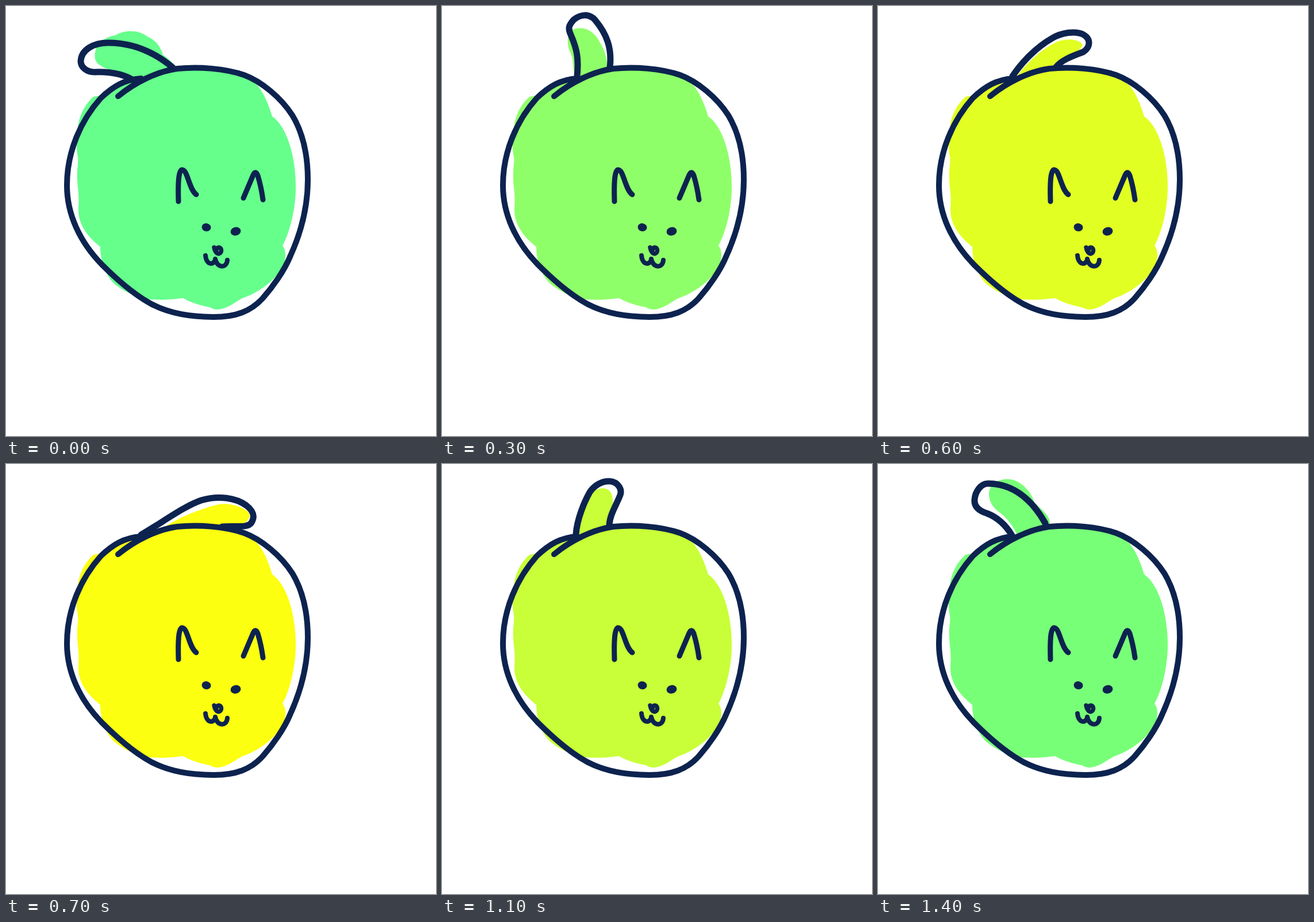
These frames come from a looping animation (748x748 px, 1.5 s). An HTML page:

```html
<!DOCTYPE html>
<html lang="en">
<head>
<meta charset="utf-8">
<title>Apple to lemon</title>
<style>
  html, body { margin: 0; width: 100%; height: 100%; overflow: hidden; background: #fff; }
  svg { display: block; width: 100%; height: 100%; }
  .ink { fill: none; stroke: #0d234f; stroke-width: 10; stroke-linecap: round; stroke-linejoin: round; }
  .face { stroke-width: 9; }
  .dot { fill: #0d234f; }
</style>
</head>
<body>
<svg viewBox="0 0 748 748">
  <g id="paint">
    <path id="leafFill"/>
    <path d="M152 158C160 155 172 158 176 153C200 132 228 128 258 117C300 104 370 104 408 118
      Q424 126 433 134C447 146 457 172 463 192C489 210 504 262 504 315C504 350 495 391 481 417
      C487 424 487 436 484 447C476 470 445 497 412 508C396 516 386 527 367 528C360 528 355 523 349 523
      Q322 517 308 508Q287 511 270 511Q247 511 234 508C214 500 200 493 187 482C172 466 164 442 164 419
      C143 402 125 381 126 352Q127 340 126 325Q123 300 124 285Q126 270 125 263C121 246 123 222 126 204
      Q132 176 152 158Z"/>
  </g>
  <path class="ink" id="leafLine" style="stroke-width:11"/>
  <path class="ink" d="M195 157C224 133 262 114 298 109C336 105 382 109 414 120C444 131 478 159 498 190
    C518 223 525 262 525 302C525 348 514 392 495 434C484 461 463 490 446 509C426 531 400 541 361 541
    C322 541 283 534 254 519C224 503 192 475 167 450C128 410 106 362 106 312C106 252 131 198 165 160
    C186 140 206 128 235 126"/>
  <g class="ink face">
    <path d="M300 340C299 310 300 286 306 285C316 284 318 319 331 328"/>
    <path d="M413 334L430 294Q434 285 438 295Q444 315 447 337"/>
    <path d="M347 434C348 446 355 450 360 447Q364 444 364 440C367 456 384 457 385 442" stroke-width="8" style="stroke-width:8"/>
    <path d="M362 420C363 426 366 431 370 431C376 430 376 420 370 420Q367 420 366 425" style="stroke-width:7.5"/>
  </g>
  <ellipse class="dot" cx="348.5" cy="385" rx="8" ry="7" transform="rotate(12 348.5 385)"/>
  <ellipse class="dot" cx="399.5" cy="392" rx="9" ry="7.3" transform="rotate(-14 399.5 392)"/>
</svg>
<script>
const $ = id => document.getElementById(id);
const STEP = 100, LOOP = 1500;

// Leaf poses from lying left to lying right
const poses = [
  { color: '#66ff8c',
    line: 'M224 131C207 119 182 114 154 115C140 115 130 106 130 96C131 76 152 64 178 64C218 64 254 77 290 107',
    fill: 'M217 130C200 112 160 112 155 92C152 73 165 55 190 51C208 40 232 42 246 53C261 60 269 71 273 85Q288 95 295 106L240 135Z' },
  { color: '#78ff78',
    line: 'M233 124C222 106 208 93 190 86C174 81 167 73 168 62C169 48 179 34 191 34C226 34 262 52 291 103',
    fill: 'M243 126C236 108 222 92 214 86C198 76 190 60 194 45C200 29 221 22 239 29C256 36 269 54 272 67C287 81 299 90 299 103L280 118Z' },
  { color: '#8fff69',
    line: 'M235 122C238 92 235 75 224 50C219 39 220 34 229 24C241 14 256 13 266 24C287 49 296 74 292 107',
    fill: 'M232 124C226 106 231 96 222 78C216 64 218 46 230 40C250 34 266 46 275 64C284 78 288 94 288 114Z' },
  { color: '#abff50',
    line: 'M235 122C236 95 236 75 238 48C240 28 252 13 265 13C279 14 287 27 288 42C290 65 291 85 292 106',
    fill: 'M235 124C232 95 234 70 241 48C250 36 268 36 275 48C284 68 286 88 290 114Z' },
  { color: '#c8ff38',
    line: 'M233 122C235 95 248 65 257 49C265 37 279 29 292 30C305 31 314 43 310 54C303 72 292 88 291 106',
    fill: 'M234 124C240 90 250 60 262 48C275 40 288 40 294 50C301 65 295 85 290 114Z' },
  { color: '#e2ff24',
    line: 'M234 122C250 98 275 72 303 56C320 46 343 43 356 49C371 57 370 71 357 80C335 88 318 95 309 107',
    fill: 'M240 124C262 95 285 75 312 62C330 55 352 58 356 68C352 80 325 90 308 114Z' },
  { color: '#fcff10',
    line: 'M235 123C270 103 310 73 340 63C370 54 400 59 418 72C432 83 433 92 427 102C420 112 400 107 376 109',
    fill: 'M276 110C295 95 345 75 372 70C395 67 420 78 424 88C424 100 410 110 380 114Z' }
];

// Rest at each end, one pose per step in between
function poseAt(ms) {
  const n = Math.floor(ms / STEP);
  return n < 8 ? Math.min(Math.max(n - 1, 0), 6) : Math.min(15 - n, 6);
}

function draw(ms) {
  const { color, line, fill } = poses[poseAt(ms % LOOP)];
  $('paint').setAttribute('fill', color);
  $('leafFill').setAttribute('d', fill);
  $('leafLine').setAttribute('d', line);
}

const start = performance.now();
function tick() {
  draw(performance.now() - start);
  requestAnimationFrame(tick);
}
tick();
</script>
</body>
</html>
```
